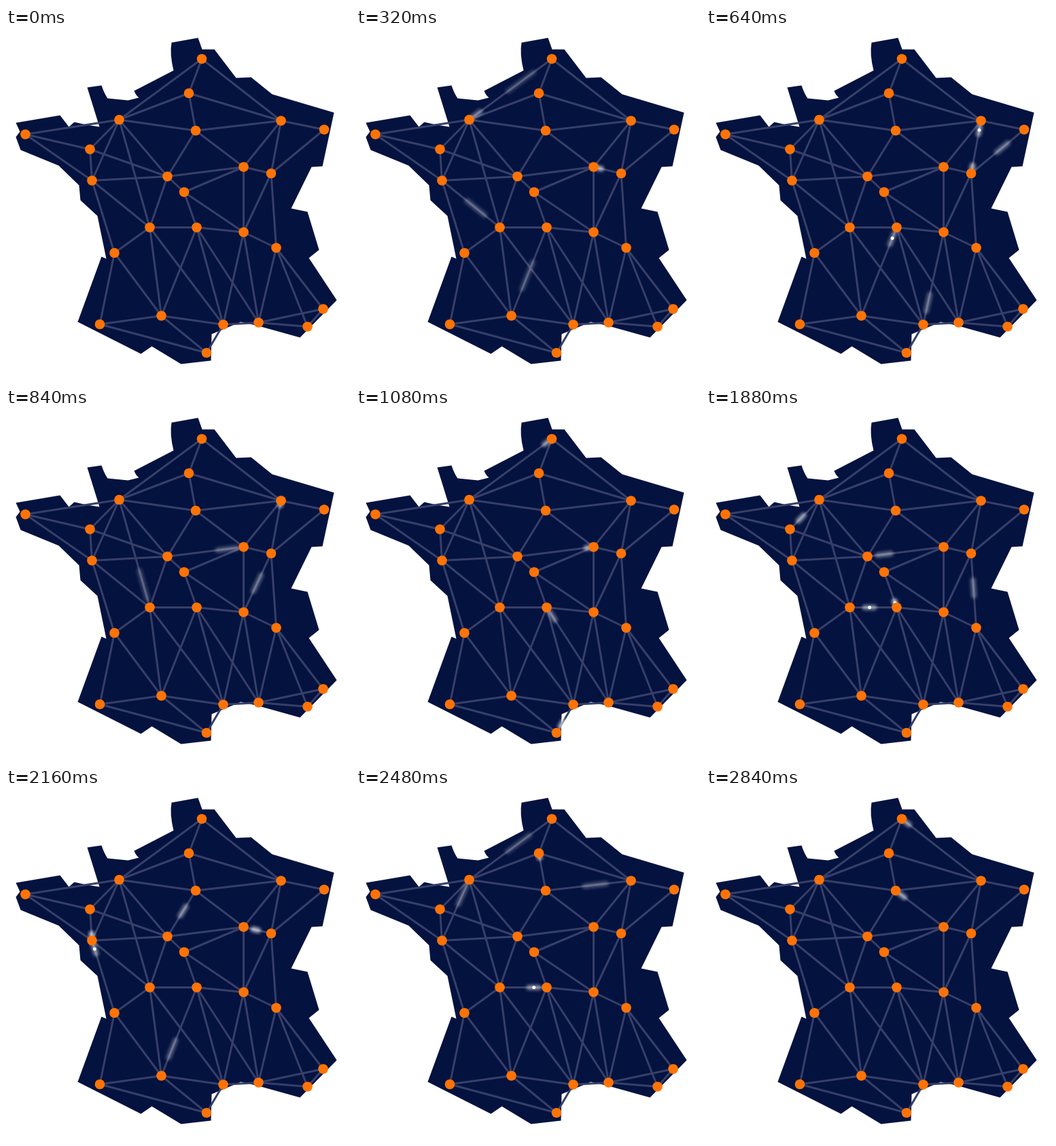
An HTML page with a canvas that plays this animation: 506x518 px, repeating every 2.88 s.

```html
<!DOCTYPE html>
<html lang="en">
<head>
<meta charset="utf-8">
<title>Network map</title>
<style>
  html, body { margin: 0; width: 100%; height: 100%; overflow: hidden; background: #fff; }
  canvas { display: block; }
</style>
</head>
<body>
<canvas id="stage" width="506" height="518"></canvas>
<script>
const ctx = document.getElementById('stage').getContext('2d');
const LOOP = 2880, STEP = 40, HOP = 180, WANDER_HOP = 140;

const land = new Path2D(`M14 139L79 128 92 145 100 138 118 142 137 145 119 87 140 84
  Q144 96 149 103L179 106 195 102Q190 98 188 92L246 62Q240 38 243 21L282 14 288 31 306 31
  338 73 360 72 391 97 482 124 465 203 449 204 419 265 443 270 460 326 445 338 486 400
  432 455 371 438 345 432 302 450 301 489 257 494 214 468 198 479 105 432 140 336 147 339
  134 276 109 253 107 231 77 202 21 179 14 160 20 152Z`);

// Nodes are named a, b, c... in this order
const nodes = {};
`288,45.5 269,96 166.5,135 279,151 404.5,136.5 468,149.5 28.5,156.5 123.5,178.5 126.5,224.5
  237.5,218.5 349.5,204.5 390,214 262,241.5 211.5,293.5 280.5,293.5 349.5,300.5 397.5,323.5
  159.5,331 138,436 228.5,423.5 319.5,436.5 371.5,433.5 443.5,439.5 466.5,413.5 295,478`
  .split(/\s+/).forEach((point, i) => {
    nodes[String.fromCharCode(97 + i)] = point.split(',').map(Number);
  });

// Each word is a node followed by the nodes it links to
const links = `abce bcde cdghijn dejk efkl fl ghi hij ijnr jkmn klmp lpq mop nortu optuv
  pquv qvwx rst sty tuy uvy vwx wx`.split(/\s+/)
  .flatMap(([hub, ...ends]) => ends.map(end => [hub, end]));

const neighbours = name => links.filter(link => link.includes(name))
  .map(([from, to]) => from === name ? to : from);

// Finds a walk of exactly `hops` links that visits no node twice
function findWalk(from, to, hops, visited = []) {
  if (hops === 0) return from === to ? [from] : null;
  for (const next of neighbours(from)) {
    if (visited.includes(next) || (next === to && hops > 1)) continue;
    const rest = findWalk(next, to, hops - 1, [...visited, next]);
    if (rest) return [from, ...rest];
  }
  return null;
}

function wander(from, to, start, end) {
  let hops = Math.max(1, Math.round((end - start) / WANDER_HOP));
  if (from === to && hops < 3) return [];
  let walk;
  while (!(walk = findWalk(from, to, hops))) hops++;
  const duration = (end - start) / hops;
  return walk.slice(1).map((name, i) =>
    ({ from: walk[i], to: name, start: start + i * duration, duration }));
}

// "ab500" hops from a to b at 500 ms, "a500" stands on a; the pulse wanders in between
function makePulse(plan, core = false) {
  const hops = [];
  let place = plan[0], free = 0;
  for (const key of plan.split(' ')) {
    const [, from, to, at] = key.match(/(\w)([a-z]?)(\d+)/);
    const start = Number(at);
    if (start > free) hops.push(...wander(place, from, free, start));
    if (to) hops.push({ from, to, start, duration: HOP });
    place = to || from;
    free = to ? start + HOP : start;
  }
  return { core, hops };
}

const pulses = [
  makePulse('a0 el590 ov1048 qx1343 mo1741 ot2047 y2840', true),
  makePulse('h0 to501 ca925 cj1300 on1781 ir2120 f2840', true),
  makePulse('d0 el496 jk927 ch1372 ch1776 hi2027 h2840'),
  makePulse('f0 fl560 c1080 gi1386 jk1824 dj2076 ea2686'),
  makePulse('y0 pu518 uy968 vp1303 ql1786 lk2063 kd2701')
];

function disc(x, y, radius, color) {
  ctx.fillStyle = color;
  ctx.beginPath();
  ctx.arc(x, y, radius, 0, Math.PI * 2);
  ctx.fill();
}

function drawLinks() {
  ctx.strokeStyle = '#363f68';
  ctx.lineWidth = 3;
  ctx.beginPath();
  for (const [from, to] of links) {
    ctx.moveTo(...nodes[from]);
    ctx.lineTo(...nodes[to]);
  }
  ctx.stroke();
}

function drawPulse({ core, hops }, time) {
  const hop = hops.find(h => time > h.start && time < h.start + h.duration);
  if (!hop) return;
  const [ax, ay] = nodes[hop.from], [bx, by] = nodes[hop.to];
  const phase = Math.PI * (time - hop.start) / hop.duration;
  const eased = (1 - Math.cos(phase)) / 2;
  const distance = Math.hypot(bx - ax, by - ay);
  const speed = distance / hop.duration * Math.PI / 2 * Math.sin(phase);
  const length = 8 + 26 * speed;

  // Faster pulses smear into longer, fainter streaks
  ctx.save();
  ctx.translate(ax + (bx - ax) * eased, ay + (by - ay) * eased);
  ctx.rotate(Math.atan2(by - ay, bx - ax));
  ctx.filter = 'blur(2px)';
  ctx.globalAlpha = Math.min(0.85, 11 / length);
  ctx.strokeStyle = '#fff';
  ctx.lineWidth = 8;
  ctx.lineCap = 'round';
  const half = Math.max(0.5, length / 2 - 5);
  ctx.beginPath();
  ctx.moveTo(-half, 0);
  ctx.lineTo(half, 0);
  ctx.stroke();
  ctx.filter = 'none';
  ctx.globalAlpha = 1;
  if (core && speed < 1 && distance < 145) disc(0, 0, 2.5, '#fff');
  ctx.restore();
}

function frame(now) {
  const time = Math.floor(now % LOOP / STEP) * STEP;
  ctx.fillStyle = '#fff';
  ctx.fillRect(0, 0, 506, 518);
  ctx.save();
  ctx.translate(0.5, 0.5);
  ctx.fillStyle = '#04123f';
  ctx.fill(land);
  ctx.restore();
  drawLinks();
  for (const pulse of pulses) drawPulse(pulse, time);
  for (const [x, y] of Object.values(nodes)) disc(x, y, 7.3, '#ff7306');
  requestAnimationFrame(frame);
}
requestAnimationFrame(frame);
</script>
</body>
</html>
```
